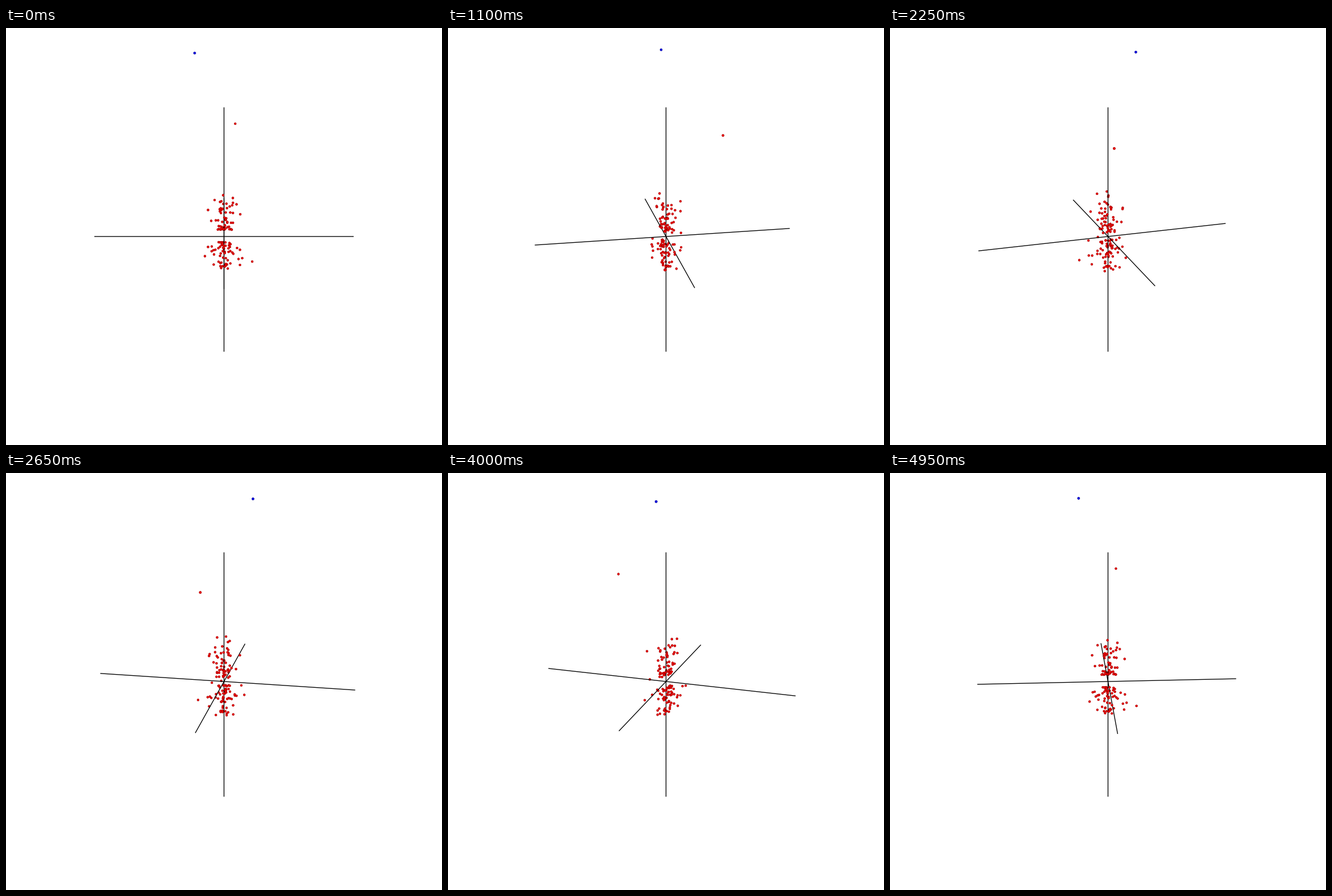
These frames come from a looping animation (765 by 732 pixels, 5 s). A matplotlib script:

```python
import numpy as np
import matplotlib.pyplot as plt
from matplotlib.animation import FuncAnimation
from matplotlib.collections import LineCollection

W, H, DPI = 765, 732, 100
FRAMES, INTERVAL = 100, 50
PX = 72 / DPI

# Camera: distance, focal length in pixels, elevation; axes reach from -1 to 1.
DIST, FOCAL = 6.0, 1365.0
UNIT = FOCAL / DIST
COS, SIN = np.cos(np.radians(20)), np.sin(np.radians(20))

# Key points: x, y from the centre and depth, in pixels at time zero.
STRAYS = [
    (-1.5, 72.5, 11), (-16.5, 64, -29), (22, 56.5, -21), (28.5, 39, 12),
    (49.5, -44, 11.4), (32, -38, 11.6), (-33.5, -34.5, 18.6), (-21.5, -17.5, -32),
]
FAR_RED = (19.7, 198, -93.2)
FAR_BLUE = (-51.5, 322, -0.8)


def unproject(spots):
    """Turn screen offsets with a known depth into (right, near, up)."""
    x, y, depth = np.array(spots, float).T
    near = depth / UNIT
    up = (y * (DIST - near * COS) + FOCAL * near * SIN) / (FOCAL * COS + y * SIN)
    right = x * (DIST - up * SIN - near * COS) / FOCAL
    return np.column_stack([right, near, up])


def project(points, angle):
    """Spin about the vertical axis; return screen places, scale and nearness."""
    right, near, up = points.T
    c, s = np.cos(angle), np.sin(angle)
    x, t = right * c - near * s, right * s + near * c
    scale = FOCAL / (DIST - up * SIN - t * COS)
    y = up * COS - t * SIN
    places = np.column_stack([W / 2 + x * scale, H / 2 - y * scale])
    return places, scale / UNIT, t


def half_cloud(rng, count, low, high):
    """Points that thin out from low to high and away from the vertical axis."""
    x, depth = np.clip(rng.laplace(0, 7, (2, count)), -28, 28)
    y = low + (high - low) * rng.random(count) ** 1.7
    return list(zip(x, y, depth))


rng = np.random.default_rng(12)
spots = STRAYS + half_cloud(rng, 54, 12, 68) + half_cloud(rng, 60, -10, -58)
cloud = unproject(spots + [FAR_RED, FAR_BLUE])
faces = np.tile([0.93, 0.0, 0.0], (len(cloud), 1))
edges = np.tile([0.64, 0.0, 0.0], (len(cloud), 1))
faces[-1], edges[-1] = (0, 0, 0.9), (0, 0, 0.6)

axis_ends = np.vstack([np.eye(3), -np.eye(3)])

fig = plt.figure(figsize=(W / DPI, H / DPI), dpi=DPI, facecolor="white")
ax = fig.add_axes([0, 0, 1, 1])
ax.set_xlim(0, W)
ax.set_ylim(H, 0)
ax.axis("off")

# Unsnapped lines keep their true position between pixels.
lines = LineCollection([], colors="black", zorder=2, linewidths=1.35 * PX)
lines.set_snap(False)
ax.add_collection(lines)
behind = ax.scatter([], [], zorder=1)
front = ax.scatter([], [], zorder=3)


def place_dots(dots, chosen, places, scale):
    dots.set_offsets(places[chosen])
    dots.set_sizes((3.7 * PX * scale[chosen]) ** 2)
    dots.set_facecolors(faces[chosen])
    dots.set_edgecolors(edges[chosen])
    dots.set_linewidths(0.65 * PX)


def update(frame):
    angle = 2 * np.pi * frame / FRAMES
    ends = project(axis_ends, angle)[0]
    lines.set_segments([ends[[i, i + 3]] for i in range(3)])

    places, scale, near = project(cloud, angle)
    order = np.argsort(scale)
    place_dots(behind, order[near[order] < 0], places, scale)
    place_dots(front, order[near[order] >= 0], places, scale)
    return lines, behind, front


anim = FuncAnimation(fig, update, frames=FRAMES, interval=INTERVAL, repeat=True)
plt.show()
```
